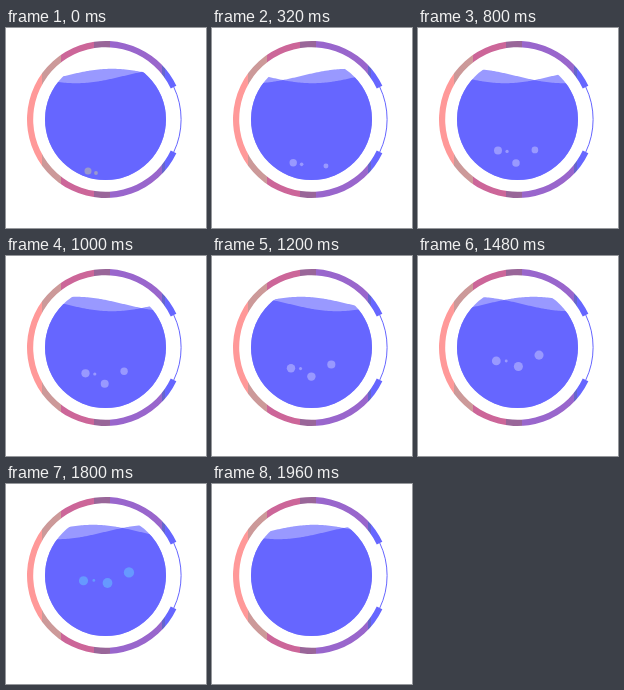
Write an HTML page with a canvas that moves like this. It is 200 px wide and 200 px high and loops after 2000 ms.

```html
<!DOCTYPE html>
<html lang="en">
<head>
<meta charset="utf-8">
<title>Liquid gauge</title>
<style>
html, body { margin: 0; width: 100%; height: 100%; overflow: hidden; background: #fff; }
canvas { display: block; width: 200px; height: 200px; }
</style>
</head>
<body>
<canvas id="stage" width="200" height="200"></canvas>
<script>
const ctx = document.getElementById('stage').getContext('2d');
const LOOP = 2000, STEP = 40, TAU = Math.PI * 2;
const CX = 99.5, CY = 91.5;
const WAVELENGTH = 190, LEVEL = 48, HEIGHT = 7.2;
const BLUE = '#6666ff', LIGHT = '#9999ff';

// Colour bands of the ring: right edge, colour
const bands = [
  [36, '#ff9999'], [55, '#cc9999'], [88, '#cc6699'],
  [104, '#996699'], [156, '#9966cc'], [159, '#6666cc'], [200, BLUE]
];

// x, y at time 0, speeds in px/ms, radius at time 0, growth, first moment
const bubbles = [
  { x: 82, y: 143, vx: -0.0025, vy: -0.0257, r: 3.5, grow: 0.0006, from: 0 },
  { x: 90, y: 145, vx: -0.0012, vy: -0.027, r: 1.9, grow: -0.0003, from: 0 },
  { x: 112, y: 148.7, vx: 0.0061, vy: -0.0335, r: 1.9, grow: 0.0018, from: 120 },
  { x: 95.2, y: 163.8, vx: 0.0035, vy: -0.036, r: 2.9, grow: 0.0011, from: 520 }
];

function disc(x, y, r, color) {
  ctx.fillStyle = color;
  ctx.beginPath();
  ctx.arc(x, y, r, 0, TAU);
  ctx.fill();
}

function ring() {
  const gap = 0.445;
  ctx.save();
  ctx.beginPath();
  ctx.arc(CX, CY, 78.5, gap, TAU - gap);
  ctx.arc(CX, CY, 72.3, TAU - gap, gap, true);
  ctx.closePath();
  ctx.clip();
  let left = 0;
  for (const [right, color] of bands) {
    ctx.fillStyle = color;
    ctx.fillRect(left, 0, right - left, 200);
    left = right;
  }
  ctx.restore();
  ctx.strokeStyle = BLUE;
  ctx.lineWidth = 1;
  ctx.beginPath();
  ctx.arc(CX, CY, 75.6, -gap, gap);
  ctx.stroke();
}

// Fills everything below the curve
function fillBelow(curve, color) {
  ctx.fillStyle = color;
  ctx.beginPath();
  ctx.moveTo(30, 160);
  for (let x = 30; x <= 170; x++) ctx.lineTo(x, curve(x));
  ctx.lineTo(170, 160);
  ctx.fill();
}

function water(t) {
  const shift = WAVELENGTH * t / LOOP;
  const sine = trough => x =>
    LEVEL + HEIGHT * Math.cos(TAU * (x - trough - shift) / WAVELENGTH);
  const a = sine(11), b = sine(70);
  ctx.save();
  ctx.beginPath();
  ctx.arc(CX, CY, 60.5, 0, TAU);
  ctx.clip();
  // One wave alone is light, both together are solid
  fillBelow(x => Math.min(a(x), b(x)), LIGHT);
  fillBelow(x => Math.max(a(x), b(x)), BLUE);
  if (t < 1900) {
    const color = t < 120 ? '#9999cc' : t < 1700 ? LIGHT : '#6699ff';
    for (const b of bubbles) {
      if (t >= b.from) disc(b.x + b.vx * t, b.y + b.vy * t, b.r + b.grow * t, color);
    }
  }
  ctx.restore();
}

const start = performance.now();
function draw() {
  const t = Math.floor((performance.now() - start) % LOOP / STEP) * STEP;
  ctx.fillStyle = '#fff';
  ctx.fillRect(0, 0, 200, 200);
  ring();
  water(t);
  requestAnimationFrame(draw);
}
draw();
</script>
</body>
</html>
```
